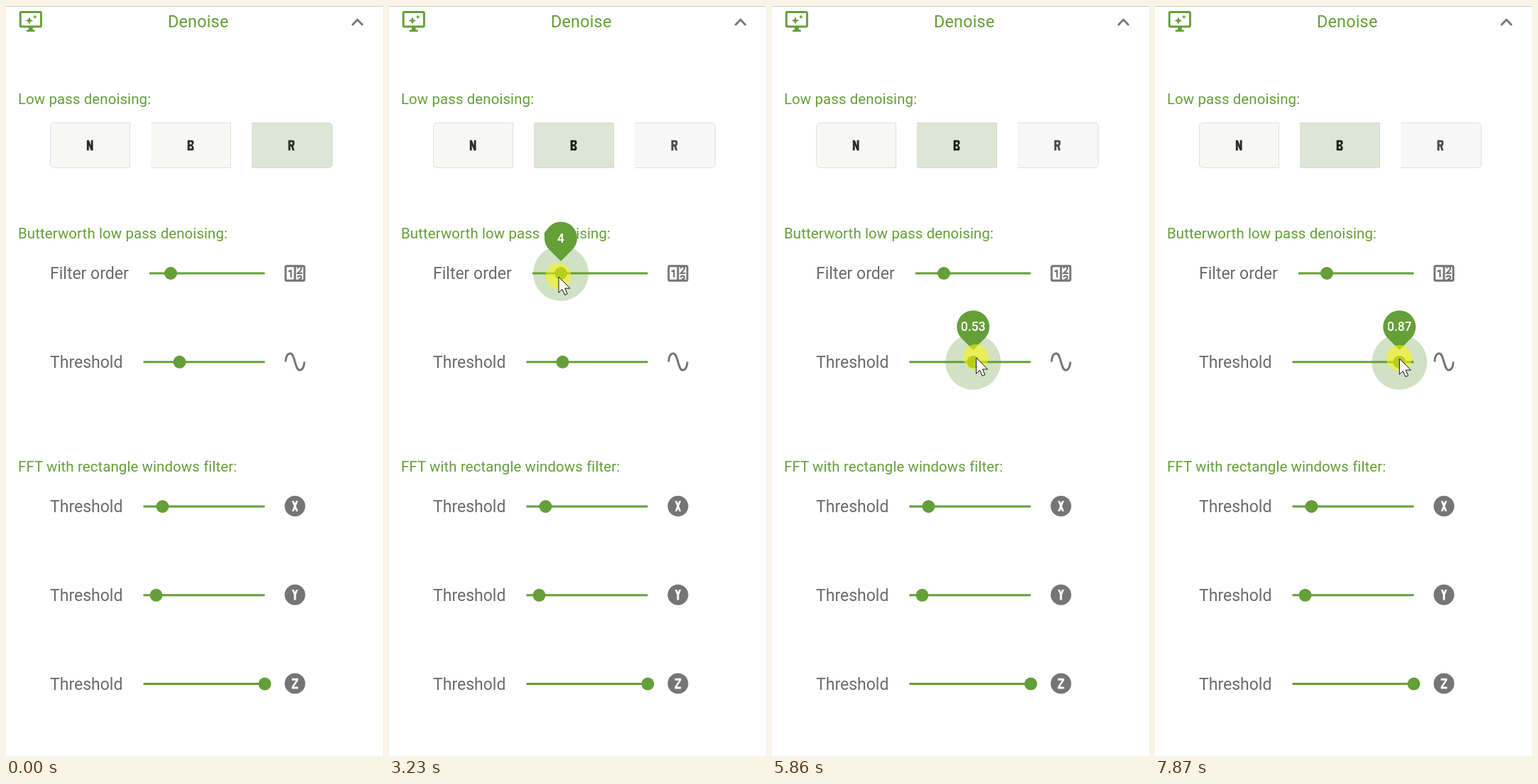
Write an HTML page that moves like this. It is 531 by 1055 pixels and loops after 8000 ms.

```html
<!DOCTYPE html>
<html lang="en">
<head>
<meta charset="utf-8">
<title>Denoise</title>
<style>
html, body { margin: 0; width: 100%; height: 100%; overflow: hidden; background: #fff; }
svg { display: block; width: 100%; height: 100%; font-family: Roboto, sans-serif; }
.title { font-size: 23.4px; letter-spacing: .2px; fill: #649f38; text-anchor: middle; }
.head { font-size: 20.4px; letter-spacing: .12px; fill: #649f38; }
.label { font-size: 23px; fill: #6b6b6b; }
.value { font-size: 17.5px; font-weight: 500; fill: #fff; text-anchor: middle; }
.track { stroke: #649f38; stroke-width: 3; }
.green { fill: #649f38; }
.halo { fill: #649f38; opacity: .3; }
.gray { fill: #757575; }
.line { fill: none; stroke: #757575; }
.box { fill: #f7f7f5; stroke: rgba(0, 0, 0, .11); }
</style>
</head>
<body>
<svg viewBox="0 0 531 1055">
  <path d="M0 .5H531" stroke="#c8c8c8"/>
  <g class="green" transform="translate(34.8 21.7) scale(1.46) translate(-12 -12)">
    <path fill-rule="evenodd" d="M21 16V4H3V16ZM21 2A2 2 0 0 1 23 4V16A2 2 0 0 1 21 18H14V20H16V22H8V20H10V18H3A2 2 0 0 1 1 16V4A2 2 0 0 1 3 2Z"/>
    <path id="spark" d="M0 -1L.28 -.28L1 0L.28 .28L0 1L-.28 .28L-1 0L-.28 -.28Z" transform="translate(10.7 11.2) scale(3.8)"/>
    <use href="#spark" transform="translate(10.2 1.500) scale(.55)"/>
  </g>
  <text class="title" x="270.7" y="30">Denoise</text>
  <path class="line" stroke-width="2.7" d="M487.5 27L495 19.3L502.5 27"/>

  <text class="head" x="17" y="138">Low pass denoising:</text>
  <path class="box" d="M174.5 164.5V227.5H67.5a5 5 0 0 1-5-5V169.5a5 5 0 0 1 5-5Z"/>
  <path id="boxB" class="box" d="M204 164.5H316.5V227.5H204"/>
  <path id="boxR" class="box" d="M346 164.5H454.5a5 5 0 0 1 5 5V222.5a5 5 0 0 1-5 5H346"/>
  <g id="letters" fill="#2d2d2b" fill-rule="evenodd"></g>

  <text class="head" x="17" y="327">Butterworth low pass denoising:</text>
  <text class="head" x="17" y="655">FFT with rectangle windows filter:</text>
  <g id="rows"></g>

  <g class="line" stroke-width="1.5" transform="translate(407 376) scale(1.46) translate(-12 -12)">
    <rect x="3" y="5" width="18" height="14" rx="1" stroke-width="2"/>
    <path stroke-width="2" d="M12 5V19"/>
    <path d="M5.7 10.2L8.2 9.3V16M14.7 7.3C14.7 4.6 18.2 4.7 18.2 7.3C18.2 8.4 17 9.5 14.7 11.9H19.2M14.7 16C14.7 14 18.2 14 18.2 16C18.2 17.3 17.5 17.8 15.5 17.8"/>
  </g>
  <path class="line" stroke-width="2" transform="translate(407 500.5) scale(1.46) translate(-12 -12)"
    d="M3 12C3 12 3 4 7.5 4C12 4 12 20 16.5 20C21 20 21 12 21 12"/>
  <g id="badges" fill="#fff"></g>

  <g id="click">
    <circle id="ring" fill="none" stroke="#a79fac" stroke-width="5" opacity=".4"/>
    <circle r="18" fill="#fff800" opacity=".54"/>
  </g>
  <g id="cursor" fill="#fff" stroke="#111" stroke-linejoin="round">
    <path id="arrow" d="M0 0V22.3L5 17.5L8.6 25.5L12.3 23.8L8.8 16.1H16Z"/>
    <path id="hand" d="M-1.8 2C-1.8 -.8 2.2 -.8 2.2 2V9.5C2.5 7.5 5.8 7.8 6 9.8C6.5 8.5 9.5 8.8 9.8 10.8C10.5 9.5 13.5 10 13.5 12.5V19C13.5 22 11.5 23 11 28H.8C.5 24.5 -4.5 20.5 -5.5 16.5C-6 14.3 -3.5 13.7 -1.8 16ZM2.2 9.5V14M6 9.8V14M9.8 10.8V14"/>
  </g>
</svg>
<script>
const $ = id => document.getElementById(id);
const glyphs = {
  N: 'M9 7H11L13 12V7H15V17H13L11 12V17H9Z',
  B: 'M9 7H13A2 2 0 0 1 15 9V10.5L13.5 12L15 13.5V15A2 2 0 0 1 13 17H9ZM11 11H13V9H11ZM11 15H13V13H11Z',
  R: 'M9 7H13A2 2 0 0 1 15 9V11L13.8 12.8L15 17H13L11.8 13H11V17H9ZM11 9V11H13V9Z',
  X: 'M9 7L11 12L9 17H11L12 14.5L13 17H15L13 12L15 7H13L12 9.5L11 7Z',
  Y: 'M9 7L11 12V17H13V12L15 7H13L12 9.5L11 7Z',
  Z: 'M9 7V9H13L9 15V17H15V15H11L15 9V7Z'
};
const glyph = (c, x, y) =>
  `<path id="glyph${c}" d="${glyphs[c]}" transform="translate(${x} ${y}) scale(1.46) translate(-12 -12)"/>`;
const rowGap = 124.8;

const row = (id, name, y, left, thumb) => `
  <text class="label" x="62" y="${y + 8}">${name}</text>
  <g transform="translate(0 ${y})">
    <path class="track" d="M${left} 0H364.5"/>
    <g id="${id}" transform="translate(${thumb})">
      <circle class="halo" r="0"/><circle class="green" r="9"/>
      <g class="tip" visibility="hidden">
        <path class="green" d="M0 -17L-16.3 -33.3A23 23 0 1 1 16.3 -33.3Z"/>
        <text class="value" y="-43.5"></text>
      </g>
    </g>
  </g>`;

$('letters').innerHTML = [...'NBR'].map((c, i) => glyph(c, 118.2 + i * 141.9, 196)).join('');
$('rows').innerHTML = row('order', 'Filter order', 376, 202, 232) +
  row('wave', 'Threshold', 376 + rowGap, 193.5, 244.5) +
  [220.5, 211.5, 364.5].map((x, i) => row('fft' + i, 'Threshold', 704 + i * rowGap, 193.5, x)).join('');
$('badges').innerHTML = [...'XYZ'].map((c, i) => {
  const y = 703.5 + i * rowGap;
  return `<circle class="gray" cx="407" cy="${y}" r="14.5"/>` + glyph(c, 407, y);
}).join('');

const STEP = 200.9;
const PRESS_B = 4, PICK_B = 6, DRAG_ORDER = 14, DROP_ORDER = 18, DRAG_WAVE = 22;

// Key points: step, x, y.
const stops = [[1, 250, 409], [PRESS_B, 270, 176], [PICK_B, 270, 176], [11, 236.5, 405.5],
  [DRAG_ORDER, 234, 380], [DROP_ORDER, 244, 382], [20, 250, 482], [DRAG_WAVE, 251, 489]];
const pulls = [[DRAG_WAVE, 244.5], [24, 260], [33, 302], [36, 338], [39, 344.3]];

const ramp = (n, a, b) => Math.min(1, Math.max(0, (n - a) / (b - a)));
// Each leg between key points adds its share of the way.
const along = (keys, n, k) => keys.reduce((v, key, i) =>
  i ? v + (key[k] - keys[i - 1][k]) * ramp(n, keys[i - 1][0], key[0]) : key[k], 0);

const show = (el, on) => el.setAttribute('visibility', on ? 'visible' : 'hidden');
const move = (el, x, y = 0) => el.setAttribute('transform', `translate(${x} ${y})`);

function slide(id, x, halo, tip, value) {
  const el = $(id), bubble = el.querySelector('.tip');
  move(el, x);
  el.querySelector('.halo').setAttribute('r', halo);
  show(bubble, tip);
  bubble.querySelector('text').textContent = value;
}

function drawButtons(n, onB) {
  const picked = n >= PICK_B;
  $('boxB').style.fill = picked ? (onB ? '#d3dfc8' : '#dde6d4') : (onB ? '#e6e6e6' : '');
  $('boxR').style.fill = picked ? '#f7f7f7' : '#dde6d4';
  $('glyphB').style.fill = picked ? '#1b1d1a' : '';
  $('glyphR').style.fill = picked ? '#464b4b' : '';
}

function drawPointer(n, onB, thumb) {
  const dragging = n >= DRAG_WAVE;
  const x = dragging ? thumb + 6.5 * (1 - ramp(n, 24, 39)) : along(stops, n, 1);
  const y = dragging ? 489 + 7 * ramp(n, 24, 30) : along(stops, n, 2);
  show($('arrow'), n >= 1 && !onB);
  show($('hand'), onB);
  move($('cursor'), x, y);

  const start = [DRAG_WAVE, DRAG_ORDER, PRESS_B].find(s => n >= s);
  show($('click'), dragging || (n >= DRAG_ORDER && n < DROP_ORDER) || (n >= PRESS_B && n < PICK_B));
  move($('click'), x - .5, y - 1);
  $('ring').setAttribute('r', n - start < 2 ? 36 - 17 * (n - start) : 0);
}

function draw(n) {
  const onB = n >= PRESS_B && n < 8;
  drawButtons(n, onB);

  const moved = n > DRAG_ORDER;
  const orderHalo = n < 19 ? 25.5 * ramp(n, 9, 10) + 13.5 * ramp(n, 13, 15) : 0;
  slide('order', moved ? 242 : 232, orderHalo, n >= DRAG_ORDER && n < DROP_ORDER, moved ? 4 : 3);

  const thumb = along(pulls, n, 1);
  const waveHalo = 25 * ramp(n, 19, 20) + 14 * ramp(n, 21, 23);
  slide('wave', thumb, waveHalo, n >= DRAG_WAVE, Number((.4 + (thumb - 260) * .00558).toFixed(2)));
  drawPointer(n, onB, thumb);
}

function loop(now) {
  draw(Math.floor(now % 8000 / STEP));
  requestAnimationFrame(loop);
}
draw(0);
requestAnimationFrame(loop);
</script>
</body>
</html>
```
